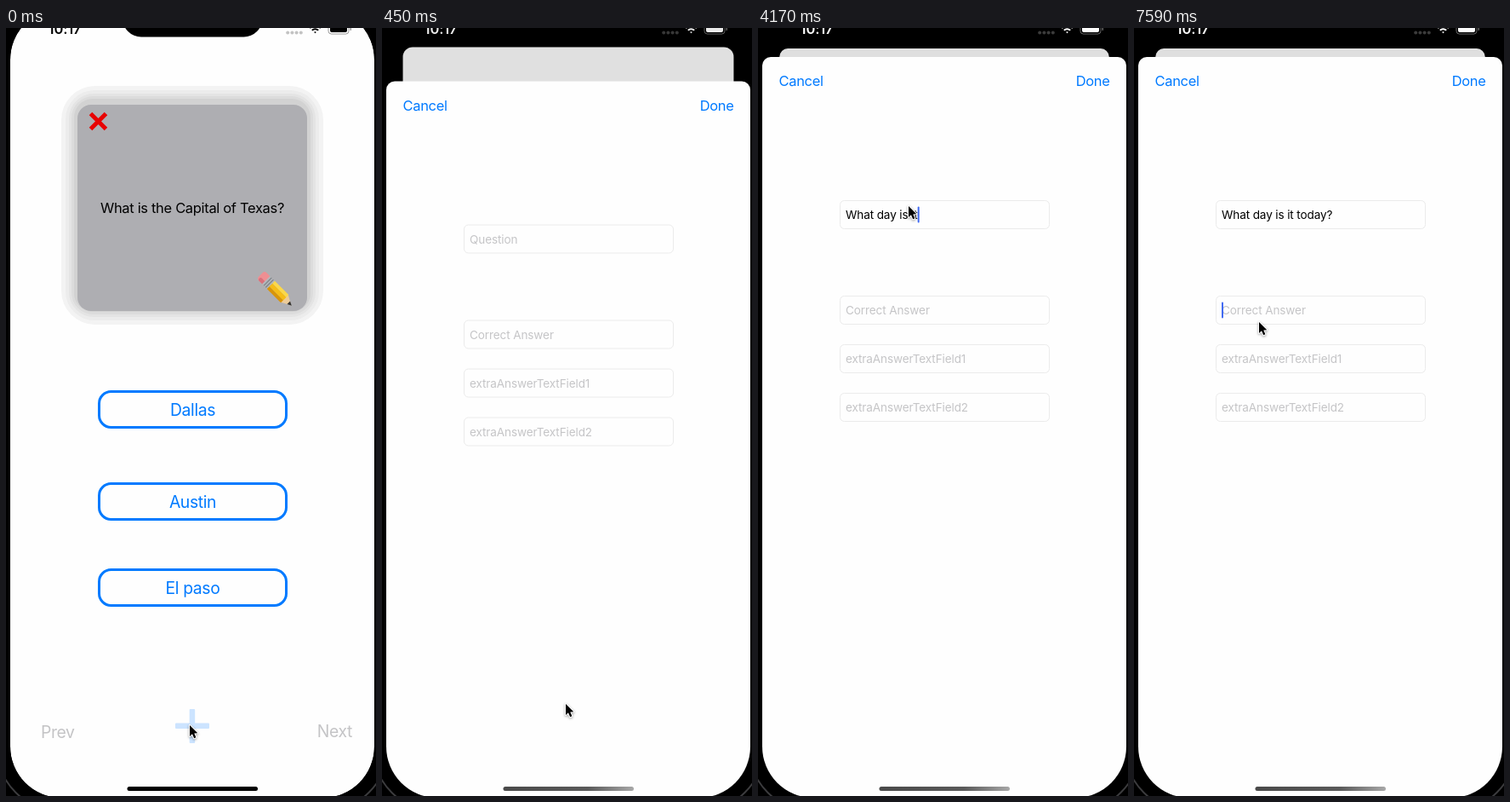
Write an HTML page with a canvas that moves like this. It is 435 px wide and 901 px high and loops after 8000 ms.

```html
<!DOCTYPE html>
<html lang="en">
<head>
<meta charset="utf-8">
<title>Flashcards</title>
<style>
  html, body { margin: 0; width: 100%; height: 100%; overflow: hidden; background: #000; }
  canvas { display: block; width: 435px; height: 901px; }
</style>
</head>
<body>
<canvas id="stage" width="435" height="901"></canvas>
<script>
const ctx = document.getElementById('stage').getContext('2d');
const LOOP = 8000, TICK = 148.8;
const SCREEN = { x: 5, y: -23, w: 428, h: 926, r: 60 };
const MID = SCREEN.x + SCREEN.w / 2;
const BLUE = '#007aff', WHITE = '#fefefe', HINT = '#c5c5c7', CARET = '#426bf2';
const QUESTION = 'What day is it today?';

// [tick, value...]: each value holds until the next entry
const TYPED = [[0, 0], [16, 1], [17, 3], [18, 5], [19, 7], [20, 6], [22, 7], [23, 9],
  [25, 10], [26, 12], [27, 13], [28, 14], [29, 15], [30, 16], [31, 17], [32, 18],
  [33, 19], [34, 20], [37, 21]];
const CARET_TOP = [[0, 0], [10, 1], [14, 0], [16, 1], [43, 0]];
const CARET_LOW = [[0, 0], [44, 1], [48, 0], [50, 0.5], [51, 1]];
const POINTER = [[0, 216, 818], [3, 216, 793], [4, 213, 655], [5, 201, 430], [6, 186, 275],
  [7, 178, 216], [8, 177, 209], [39, 174, 225], [40, 165, 275], [41, 152, 330],
  [42, 148, 356], [43, 147, 345]];

const at = (keys, k) => keys.filter(e => e[0] <= k).pop();
const lerp = (a, b, p) => a + (b - a) * p;

function box(x, y, w, h, r, fill) {
  ctx.beginPath();
  ctx.roundRect(x, y, w, h, r);
  if (fill) { ctx.fillStyle = fill; ctx.fill(); }
}

function outline(x, y, w, h, r, color, width) {
  box(x, y, w, h, r);
  ctx.strokeStyle = color;
  ctx.lineWidth = width;
  ctx.stroke();
}

function shape(points, fill) {
  ctx.beginPath();
  points.forEach(([x, y]) => ctx.lineTo(x, y));
  ctx.closePath();
  ctx.fillStyle = fill;
  ctx.fill();
}

function setFont(size, track = -0.02, weight = 400) {
  ctx.font = `${weight} ${size}px Inter, "Open Sans", sans-serif`;
  ctx.letterSpacing = `${size * track}px`;
}

function text(str, x, y, color, align = 'left') {
  ctx.textAlign = align;
  ctx.fillStyle = color;
  ctx.fillText(str, x, y);
}

function pencil() {
  ctx.save();
  ctx.translate(301.5, 291.5);
  ctx.rotate(Math.PI / 4);
  box(-3, -6.5, 11, 13, 3.5, '#ee8f93');
  box(-1, 2, 9, 4.5, 2, '#d8717c');
  box(6, -6.5, 8, 13, 0, '#b4b8bc');
  box(8, -6.5, 1.5, 13, 0, '#85898e');
  box(11, -6.5, 1.5, 13, 0, '#85898e');
  shape([[36, -6.5], [48, 0], [36, 6.5]], '#eccb9a');
  shape([[43.5, -2.5], [48.5, 0], [43.5, 2.5]], '#333');
  box(14, -6.5, 23, 4, 0, '#fbd84a');
  box(14, -2.5, 23, 5, 0, '#f6bd16');
  box(14, 2.5, 23, 4, 0, '#d99508');
  ctx.restore();
}

function card() {
  const rings = [[19, '#f3f3f3'], [14, '#ececec'], [10, '#e4e4e4'], [7, '#dcdcdc'], [4, '#d2d2d2']];
  rings.forEach(([d, c]) => box(84 - d, 87 - d, 270 + 2 * d, 242 + 2 * d, 17 + d * 1.2, c));
  box(84, 90, 270, 242, 16, '#aeaeb2');
  ctx.strokeStyle = '#e80202';
  ctx.lineWidth = 5;
  ctx.beginPath();
  ctx.moveTo(99.5, 100.5); ctx.lineTo(117.5, 118.5);
  ctx.moveTo(117.5, 100.5); ctx.lineTo(99.5, 118.5);
  ctx.stroke();
  setFont(16.5);
  text('What is the Capital of Texas?', MID, 217, '#000', 'center');
  pencil();
}

function quiz(p) {
  const s = 1 - 0.0946 * p;
  const r = lerp(SCREEN.r, 11, p);
  ctx.save();
  ctx.translate(MID, SCREEN.y + 47 * p);
  ctx.scale(s, s);
  ctx.translate(-MID, -SCREEN.y);
  box(SCREEN.x, SCREEN.y, SCREEN.w, SCREEN.h, r, WHITE);
  card();
  setFont(19.4);
  [['Dallas', 425], ['Austin', 533], ['El paso', 634]].forEach(([label, y]) => {
    outline(109.5, y + 1.5, 220, 42, 14, BLUE, 3);
    text(label, 219.5, y + 29.5, BLUE, 'center');
  });
  text('Prev', 41, 833, '#c4c4c6');
  text('Next', 407, 832, '#c4c4c6', 'right');
  box(199, 815.5, 40, 6.5, 1, '#cce4ff');
  box(215.7, 799, 6.5, 40, 1, '#cce4ff');
  box(SCREEN.x, SCREEN.y, SCREEN.w, SCREEN.h, r, `rgba(0,0,0,${0.12 * p})`);
  ctx.restore();
}

function statusBar(p) {
  const v = Math.round(255 * p ** 2.5);
  const color = `rgb(${v},${v},${v})`;
  setFont(16.5, -0.01, 600);
  text('10:17', 69, 7, color, 'center');

  ctx.globalAlpha = 0.23;
  ctx.fillStyle = color;
  for (let i = 0; i < 4; i++) {
    ctx.beginPath();
    ctx.arc(331.2 + i * 5.2, 5.6, 2, 0, 7);
    ctx.fill();
  }
  ctx.globalAlpha = 0.4;
  outline(379, -4.5, 24, 11.5, 3.5, color, 1);
  box(404.5, -1, 1.5, 4, 1, color);
  ctx.globalAlpha = 1;
  box(381, -2.5, 20, 7.5, 2, color);

  ctx.strokeStyle = color;
  ctx.lineWidth = 2;
  [1, 5, 8.8].forEach(r => {
    ctx.beginPath();
    ctx.arc(363.5, 6.2, r, -Math.PI * 0.76, -Math.PI * 0.24);
    ctx.stroke();
  });
}

function caret(x, y, alpha) {
  ctx.globalAlpha = alpha;
  box(x, y, 2, 19, 1, CARET);
  ctx.globalAlpha = 1;
}

function field(y, hint, value = '') {
  outline(96.5, y + 0.5, 246, 33, 5, '#ebebeb', 1);
  text(value || hint, 103, y + 22, value ? '#000' : HINT);
}

function sheet(top, k) {
  box(SCREEN.x, top, SCREEN.w, SCREEN.h, 10, WHITE);
  setFont(16.5);
  text('Cancel', 24.5, top + 34, BLUE);
  text('Done', 413.5, top + 34, BLUE, 'right');

  const typed = QUESTION.slice(0, at(TYPED, k)[1]);
  setFont(13.6, -0.01);
  field(top + 168, 'Question', typed);
  field(top + 280, 'Correct Answer');
  field(top + 337, 'extraAnswerTextField1');
  field(top + 394, 'extraAnswerTextField2');
  caret(103 + ctx.measureText(typed).width, top + 175.5, at(CARET_TOP, k)[1]);
  caret(103, top + 287.5, at(CARET_LOW, k)[1]);
}

function homeBar(shown) {
  let fill = '#000';
  if (shown) {
    fill = ctx.createLinearGradient(143, 0, 296, 0);
    fill.addColorStop(0, '#4a4a4a');
    fill.addColorStop(0.65, '#5a5a5a');
    fill.addColorStop(1, '#a8a8a8');
  }
  box(142.5, 890, 153.5, 5, 2.5, fill);
}

function pointer(x, y) {
  ctx.save();
  ctx.translate(x, y);
  ctx.beginPath();
  [[0, 0], [0, 13], [3, 10.3], [5.2, 15.3], [7.4, 14.3], [5.3, 9.5], [9.3, 9.3]]
    .forEach(([a, b]) => ctx.lineTo(a, b));
  ctx.closePath();
  ctx.shadowColor = 'rgba(0,0,0,0.4)';
  ctx.shadowBlur = 3;
  ctx.shadowOffsetY = 1;
  ctx.lineWidth = 2;
  ctx.lineJoin = 'round';
  ctx.strokeStyle = '#fff';
  ctx.stroke();
  ctx.shadowColor = 'transparent';
  ctx.fillStyle = '#000';
  ctx.fill();
  ctx.restore();
}

function draw(ms) {
  const k = Math.floor((ms + 12) / TICK);
  // critically damped spring brings the sheet up
  const u = Math.max(0, 2.45 * k - 2.1);
  const rest = (1 + u) * Math.exp(-u);
  const p = 1 - rest;

  box(0, 0, 435, 901, 0, '#000');
  outline(-11, -39, 460, 958, 76, '#3c3c3e', 2);
  ctx.save();
  box(SCREEN.x, SCREEN.y, SCREEN.w, SCREEN.h, SCREEN.r, '#000');
  ctx.clip();
  quiz(p);
  statusBar(p);
  if (k > 0) sheet(34 + 869 * rest, k);
  box(137, -60, 164.5, 70.5, 22, '#000');
  homeBar(k > 1);
  ctx.restore();
  const [, x, y] = at(POINTER, k);
  pointer(x, y);
}

const start = performance.now();
function frame() {
  draw((performance.now() - start) % LOOP);
  requestAnimationFrame(frame);
}
frame();
</script>
</body>
</html>
```
